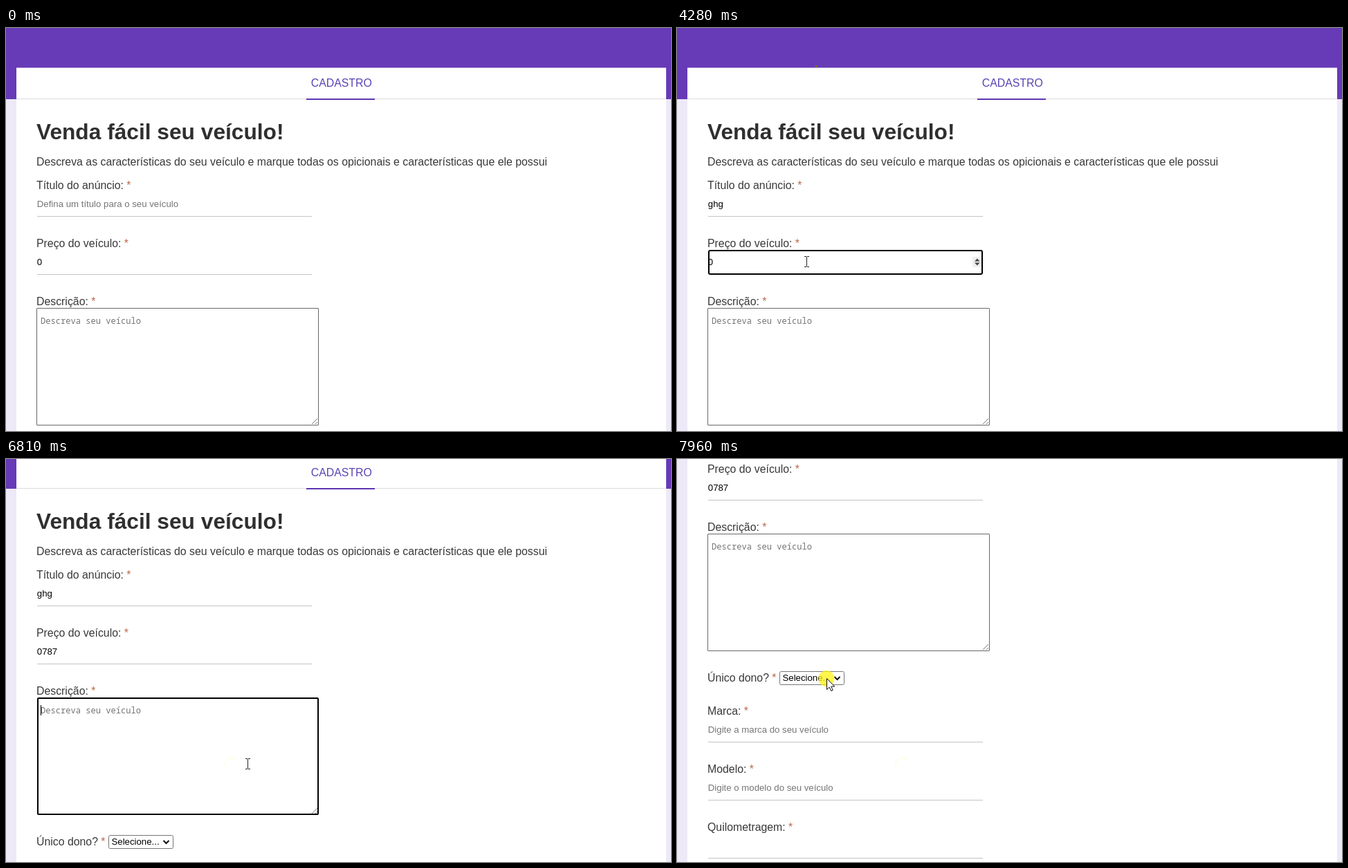
These frames come from a looping animation (961 by 583 pixels, 8 s). An HTML page with a canvas:

```html
<!DOCTYPE html>
<html lang="pt-BR">
<head>
<meta charset="utf-8">
<title>Cadastro</title>
<style>
  html, body { margin: 0; width: 100%; height: 100%; overflow: hidden; background: #fff; }
  canvas { display: block; width: 961px; height: 583px; }
</style>
</head>
<body>
<canvas id="stage"></canvas>
<script>
const W = 961, H = 583, LOOP = 8000, STEP = 70;
const canvas = document.getElementById('stage');
const ratio = window.devicePixelRatio || 1;
canvas.width = W * ratio;
canvas.height = H * ratio;
const ctx = canvas.getContext('2d');

const SANS = '"Liberation Sans", Arial, sans-serif';
const MONO = '"Noto Sans Mono", "DejaVu Sans Mono", monospace';
const BODY = '15.85px ' + SANS;
const SMALL = '13.22px ' + SANS;
const PURPLE = '#673ab7', INK = '#383838', HINT = '#757575', FRAME = '#767676';

// Time, value: the last entry already reached applies.
const SCROLL = [[0, 0], [6810, 60], [6880, 140], [6960, 198], [7030, 255], [7100, 297]];
const TITLE = [[0, ''], [2670, 'g'], [2880, 'gh'], [3090, 'ghg']];
const PRICE = [[0, '0'], [5160, '07'], [5300, '078'], [5430, '0787']];
const FOCUS = [[0, ''], [1670, 'title'], [3560, 'price'], [6600, 'text'], [7960, '']];
const CARET = [[0, false], [2670, true], [4170, false], [4690, true], [6880, false]];

// Time, x, y, shape held until the next entry.
const POINTER = [
  [0, 0, 0, ''], [120, 946, 516, 'arrow'], [190, 0, 0, ''],
  [1050, 200, 53, 'arrow'], [1330, 156, 236, 'beam'], [1470, 149, 261, 'beam'],
  [3090, 149, 261, 'beam'], [3160, 154, 276, 'arrow'], [3350, 172, 309, 'arrow'],
  [3490, 183, 331, 'beam'], [3830, 187, 338, 'beam'], [4890, 187, 338, 'beam'],
  [4960, 189, 338, 'beam'], [5160, 189, 338, 'beam'], [5560, 208, 344, 'beam'],
  [5700, 238, 357, 'arrow'], [5910, 287, 374, 'arrow'], [6190, 306, 405, 'beam'],
  [6600, 327, 443, 'beam'], [6740, 349, 441, 'beam'], [7100, 349, 441, 'arrow'],
  [7610, 222, 354, 'arrow'], [7960, 216, 317, 'arrow']
];
// Start, end, x, y
const CLICKS = [[1670, 1750, 149, 261], [3560, 3630, 186, 337], [4340, 4410, 187, 338],
  [6600, 6670, 327, 443], [7960, 8000, 216, 317.5]];

const at = (list, t) => list.filter(e => e[0] <= t).pop()[1];

function rect(x, y, w, h, color) {
  ctx.fillStyle = color;
  ctx.fillRect(x, y, w, h);
}

function box(x, y, w, h, line, r, color) {
  ctx.beginPath();
  ctx.roundRect(x + line / 2, y + line / 2, w - line, h - line, r);
  ctx.lineWidth = line;
  ctx.strokeStyle = color;
  ctx.stroke();
}

function text(str, x, y, font, color) {
  ctx.font = font;
  ctx.fillStyle = color;
  ctx.fillText(str, x, y);
  return ctx.measureText(str).width;
}

function lines(points, color, width) {
  ctx.beginPath();
  points.forEach(([x, y], i) => i ? ctx.lineTo(x, y) : ctx.moveTo(x, y));
  ctx.strokeStyle = color;
  ctx.lineWidth = width;
  ctx.stroke();
}

function label(str, y) {
  const w = text(str + ' ', 44, y, BODY, INK);
  text('*', 44 + w, y, BODY, '#b9694a');
}

// A labelled line input; y is the top of its box.
function field(name, y, value, hint, focused, caret) {
  label(name, y - 4);
  if (value) {
    const w = text(value, 44.8, y + 22, SMALL, '#000');
    if (focused && caret) rect(Math.round(44.8 + w), y + 10, 1, 15, '#000');
  } else {
    text(hint, 44.8, y + 22, SMALL, HINT);
  }
  if (focused) box(45, y, 397, 36, 2, 2, '#000');
  else rect(45, y + 35, 397, 1, '#c4c4c4');
}

function spinner(y) {
  rect(427, y, 13, 15, '#efefef');
  for (const s of [-1, 1]) {
    const base = y + 7.5 + s;
    ctx.beginPath();
    ctx.moveTo(430, base);
    ctx.lineTo(437.5, base);
    ctx.lineTo(433.75, base + s * 4);
    ctx.fillStyle = '#444';
    ctx.fill();
  }
}

function header() {
  rect(0, 0, W, 103, PURPLE);
  rect(15, 57.5, 939, 45.5, '#fff');
  rect(15, 102, 939, 1, '#dcdcdc');
  rect(434, 102, 99, 2, '#5e35b1');
  text('CADASTRO', 440.7, 85, BODY, '#5a43b2');
}

function textarea(focused, caret) {
  label('Descrição:', 401);
  text('Descreva seu veículo', 50, 428, '12.1px ' + MONO, HINT);
  if (focused) box(45, 405, 407, 170, 2, 1, '#000');
  else box(44, 405, 408, 170, 1, 0.5, '#686868');
  lines([[442, 573], [450, 565]], '#777', 1);
  lines([[447, 573], [450, 570]], '#777', 1);
  if (focused && caret) rect(50, 416, 1, 15, '#000');
}

function select() {
  label('Único dono?', 619);
  rect(148, 604, 94, 20, '#fff');
  box(148, 604, 94, 20, 1, 2, FRAME);
  text('Selecione...', 152.5, 618, SMALL, '#000');
  lines([[227.5, 612], [231.5, 616], [235.5, 612]], '#111', 2);
}

function page(t) {
  const focus = at(FOCUS, t), caret = at(CARET, t);
  header();
  if (t >= 1120) rect(200, 54, 3, 3, '#76683f');
  text('Venda fácil seu veículo!', 44, 161, 'bold 31.7px ' + SANS, '#2f2f2f');
  text('Descreva as características do seu veículo e marque todas os opicionais e características que ele possui',
    44, 199, BODY, INK);
  field('Título do anúncio:', 237, at(TITLE, t), 'Defina um título para o seu veículo', focus === 'title', caret);
  if (t >= 3280 && t < 5980) spinner(331);
  field('Preço do veículo:', 321, at(PRICE, t), '', focus === 'price', caret);
  textarea(focus === 'text', caret);
  select();
  field('Marca:', 671, '', 'Digite a marca do seu veículo');
  field('Modelo:', 755, '', 'Digite o modelo do seu veículo');
  field('Quilometragem:', 839, '', '');
}

function arrow(x, y) {
  ctx.beginPath();
  [[0, 0], [0, 16], [3.7, 12.6], [6.2, 18], [8.7, 17], [6.3, 11.6], [11.2, 11.6]]
    .forEach(([dx, dy]) => ctx.lineTo(x + 0.5 + dx, y + 0.5 + dy));
  ctx.closePath();
  ctx.fillStyle = '#fff';
  ctx.fill();
  ctx.strokeStyle = '#111';
  ctx.lineWidth = 1;
  ctx.stroke();
}

function beam(x, y) {
  rect(x, y - 7, 1, 14, '#222');
  for (const dy of [-8, 7]) {
    rect(x - 3, y + dy, 3, 1, '#222');
    rect(x + 1, y + dy, 3, 1, '#222');
  }
}

function pointer(t) {
  const i = POINTER.filter(k => k[0] <= t).length - 1;
  const [t0, x0, y0, shape] = POINTER[i];
  if (!shape) return;
  const next = POINTER[i + 1];
  let x = x0, y = y0;
  if (next && next[3]) {
    const p = Math.floor((t - t0) / STEP) * STEP / (next[0] - t0);
    x = Math.round(x0 + (next[1] - x0) * p);
    y = Math.round(y0 + (next[2] - y0) * p);
  }
  (shape === 'arrow' ? arrow : beam)(x, y);
}

function clicks(t) {
  for (const [from, to, x, y] of CLICKS) {
    if (t < from || t >= to) continue;
    ctx.beginPath();
    ctx.arc(x, y, 11.5, 0, 7);
    ctx.fillStyle = 'rgba(255, 242, 20, 0.75)';
    ctx.fill();
  }
  // Faint trace left by the click in the text area.
  if (t >= 6670) {
    ctx.beginPath();
    ctx.arc(327, 443, 11, Math.PI * 0.95, Math.PI * 1.7);
    ctx.strokeStyle = '#fffbd2';
    ctx.lineWidth = 1;
    ctx.stroke();
  }
}

function draw(t) {
  ctx.setTransform(ratio, 0, 0, ratio, 0, 0);
  rect(0, 0, W, H, '#ede9f7');
  const scroll = at(SCROLL, t);
  const top = scroll ? 0 : 58;
  rect(15, top, 939, H - top, '#fff');
  ctx.save();
  ctx.translate(0, -scroll);
  page(t);
  ctx.restore();
  clicks(t);
  pointer(t);
}

const start = performance.now();
function tick() {
  draw((performance.now() - start) % LOOP);
  requestAnimationFrame(tick);
}
tick();
</script>
</body>
</html>
```
